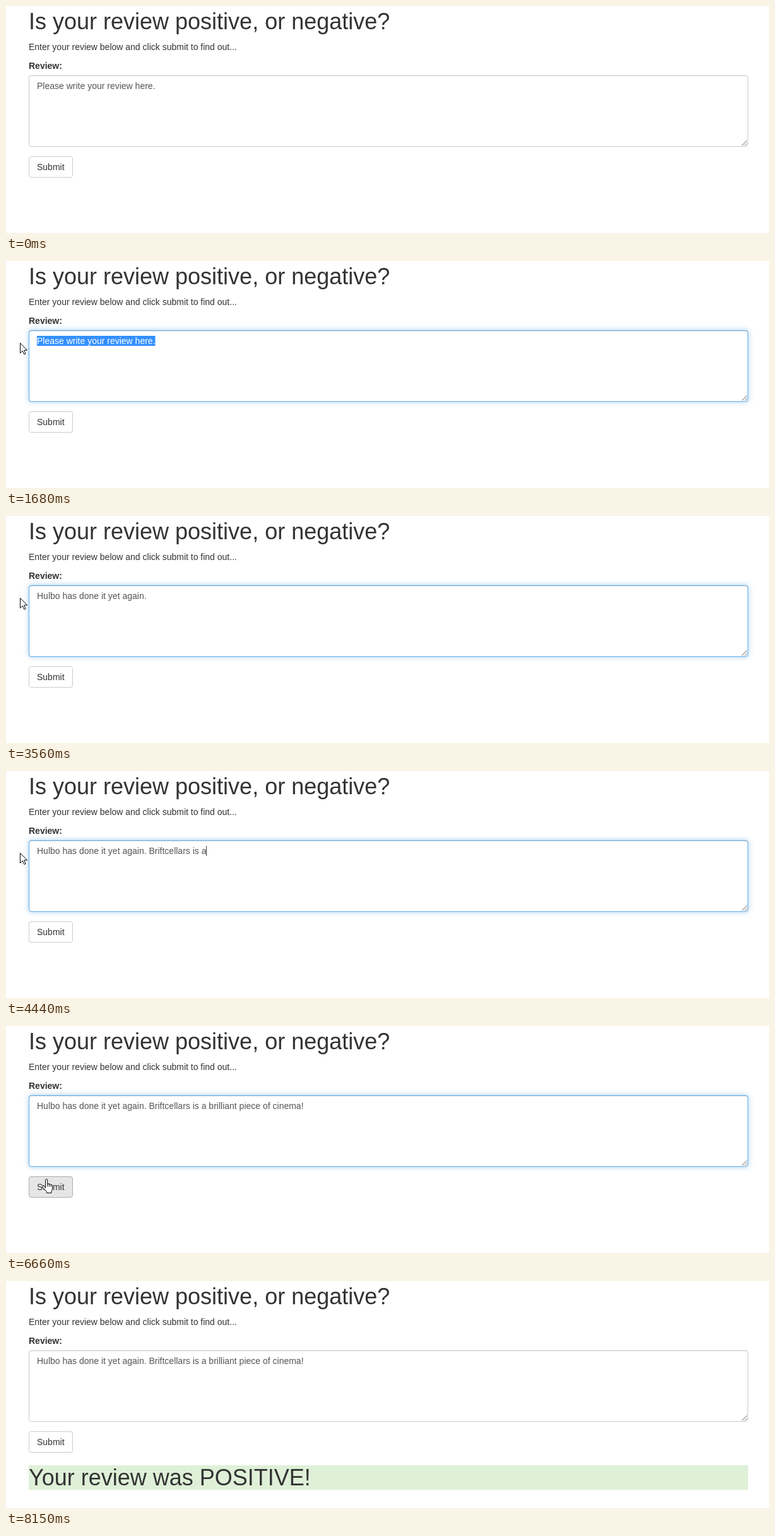
Write an HTML page that moves like this. It is 1209 px wide and 361 px high and loops after 8250 ms.

```html
<!DOCTYPE html>
<html lang="en">
<head>
<meta charset="utf-8">
<title>Review form</title>
<style>
html, body { margin: 0; width: 100%; height: 100%; overflow: hidden; background: #fff; }
#stage { position: relative; width: 1209px; height: 361px; overflow: hidden;
  font: 14px/20px "Liberation Sans", Arial, sans-serif; color: #333; }
#stage > * { position: absolute; box-sizing: border-box; white-space: pre; }
.title { left: 36px; font-size: 36px; line-height: 39.6px; }
.box { left: 36px; top: 110px; width: 1140px; height: 114px; border: 1px solid #ccc; border-radius: 4px;
  box-shadow: inset 0 1px 1px rgba(0,0,0,.075); }
#focus { border-color: #66afe9;
  box-shadow: inset 0 1px 1px rgba(0,0,0,.075), 0 0 8px rgba(102,175,233,.6); }
.line { left: 49px; top: 119px; height: 16px; line-height: 16px; }
#text { color: #555; }
#marked { color: #fff; background: #3390ff; }
#caret { top: 119px; width: 1px; height: 16px; background: #444; }
#button { left: 36px; top: 239px; width: 70px; height: 34px; padding: 6px 12px;
  border: 1px solid #ccc; border-radius: 4px; }
#button.hover { background: #e6e6e6; border-color: #adadad; }
#button.down { background: #d4d4d4; border-color: #8c8c8c; box-shadow: inset 0 3px 5px rgba(0,0,0,.125); }
#result { top: 293px; width: 1140px; height: 39px; background: #dff0d8; }
svg { left: 0; top: 0; }
</style>
</head>
<body>
<div id="stage">
  <div class="title" style="top:5.4px">Is your review positive, or negative?</div>
  <div style="left:36px;top:55px">Enter your review below and click submit to find out...</div>
  <b style="left:36px;top:85px">Review:</b>
  <div class="box"></div>
  <div class="box" id="focus"></div>
  <div class="line" id="text"></div>
  <div class="line" id="marked"></div>
  <div id="caret"></div>
  <div id="button">Submit</div>
  <div class="title" id="result">Your review was POSITIVE!</div>
  <svg width="1209" height="361" fill="none">
    <path d="M1166 222l8-8M1170.5 222l3.5-3.5" stroke="#666"/>
    <circle id="spot" r="11" fill="#ff0" fill-opacity=".5"/>
    <g id="pointer" stroke="#000" stroke-linejoin="round">
      <path id="arrow" fill="#fff" d="M.5.5v16l3.7-3.6 2.6 5.6 2.3-1-2.5-5.6h5z"/>
      <path id="beam" d="M-3-7.5h3M1-7.5h3M.5-7v14M-3 7.5h3M1 7.5h3"/>
      <g id="hand" transform="translate(-6 0)">
        <path fill="#fff" d="M5.5 14.5V2.2a1.6 1.6 0 0 1 3.2 0V8.5q1.2-1.5 2.7.2 1.6-1.1 2.6.6 2.5-.6 2.5 1.8V15q0 3-1.6 5v2.5H7.6V20.5Q4.5 17.5 1 13.2 0 11 2.2 10.9 4 11.5 5.5 14.5z"/>
        <path d="M8.7 8.5v4M11.4 9v3.5M14 9.6v3"/>
      </g>
    </g>
  </svg>
</div>
<script>
const LOOP = 8250;
const PROMPT = "Please write your review here.";
const REVIEW = "Hulbo has done it yet again. Briftcellars is a brilliant piece of cinema!";

// typing bursts: start, ms per key, keys
const BURSTS = [
  [1810, 85, 8], [2510, 18, 7], [2640, 70, 12], [3480, 180, 1],
  [3660, 41, 15], [4340, 45.5, 17], [5170, 20, 1], [5190, 52, 12]
];

// pointer moves: start, end, from x, y, to x, y
const MOVES = [
  [60, 860, 962, 324, 251, 134],
  [960, 1060, 251, 132, 232, 131],
  [1080, 1580, 215, 130, 23, 130],
  [1680, 1780, 22, 130, 22, 130],
  [5960, 6660, 29, 132, 63, 243],
  [6760, 6860, 63, 245, 63, 247],
  [7290, 7990, 63, 247, 72, 372]
];
const TICK = 100;

const $ = id => document.getElementById(id);
const el = {};
for (const id of ["focus", "text", "marked", "caret", "button", "result", "spot", "pointer", "arrow", "beam", "hand"])
  el[id] = $(id);

const pen = document.createElement("canvas").getContext("2d");
pen.font = '14px "Liberation Sans", Arial, sans-serif';
const edge = (s, n) => 49 + pen.measureText(s.slice(0, n)).width;
const show = (node, on) => { node.style.display = on ? "" : "none"; };
const within = (t, a, b) => t >= a && t < b;
const smooth = p => p * p * (3 - 2 * p);
const inside = (p, x0, y0, x1, y1) => within(p.x, x0, x1) && within(p.y, y0, y1);

function pointerAt(t) {
  const move = MOVES.filter(m => t >= m[0]).pop();
  if (!move) return { x: -99, y: -99 };
  const [a, b, x0, y0, x1, y1] = move;
  const held = Math.floor((t - a) / TICK) * TICK;
  const k = smooth(Math.min(1, held / (b - a)));
  return { x: Math.round(x0 + (x1 - x0) * k), y: Math.round(y0 + (y1 - y0) * k) };
}

function typedAt(t) {
  let count = 0, last = 960;
  for (const [start, gap, keys] of BURSTS) {
    if (t < start) break;
    const n = Math.min(keys, Math.floor((t - start) / gap) + 1);
    count += n;
    last = start + (n - 1) * gap;
  }
  return { count, last };
}

// index of the character edge nearest to x
function nearest(s, x) {
  let best = 0;
  for (let i = 1; i <= s.length; i++)
    if (Math.abs(edge(s, i) - x) < Math.abs(edge(s, best) - x)) best = i;
  return best;
}

function draw(t) {
  const p = pointerAt(t);
  const { count, last } = typedAt(t);
  const text = count ? REVIEW.slice(0, count) : PROMPT;
  const dragging = within(t, 960, 1680);
  const clicking = within(t, 6960, 7060);
  const onButton = inside(p, 36, 239, 106, 273);

  // text, selection and caret
  const from = within(t, 960, 1810) ? nearest(PROMPT, p.x + 2.5) : PROMPT.length;
  const selected = !count && from < PROMPT.length;
  el.text.textContent = text;
  el.marked.textContent = PROMPT;
  el.marked.style.clipPath = `inset(0 0 0 ${edge(PROMPT, from) - 49}px)`;
  show(el.marked, selected);
  const lit = Math.floor((t - last) / 500) % 2 === 0 && !within(t, 3560, 3660);
  show(el.caret, within(t, 960, 6960) && !selected && lit);
  el.caret.style.left = Math.floor(edge(text, text.length)) + "px";

  // form states
  el.focus.style.opacity = within(t, 1060, 6960) ? 1 : within(t, 960, 7060) ? 0.5 : 0;
  const hover = onButton || within(t, 6960, 8150);
  el.button.className = clicking ? "down" : hover ? "hover" : "";
  show(el.result, t >= 7290);

  // pointer
  const overText = inside(p, 36, 110, 1176, 224) || (t >= 7290 && inside(p, 36, 293, 483, 332));
  const shape = dragging || overText ? "beam" : onButton ? "hand" : "arrow";
  for (const s of ["arrow", "beam", "hand"]) show(el[s], s === shape);
  show(el.pointer, within(t, 60, 7990));
  el.pointer.setAttribute("transform", `translate(${p.x} ${p.y})`);
  show(el.spot, dragging || clicking);
  el.spot.setAttribute("cx", p.x - (dragging ? 2 : 0));
  el.spot.setAttribute("cy", p.y);
}

const begin = performance.now();
function frame() {
  draw((performance.now() - begin) % LOOP);
  requestAnimationFrame(frame);
}
draw(0);
requestAnimationFrame(frame);
</script>
</body>
</html>
```
